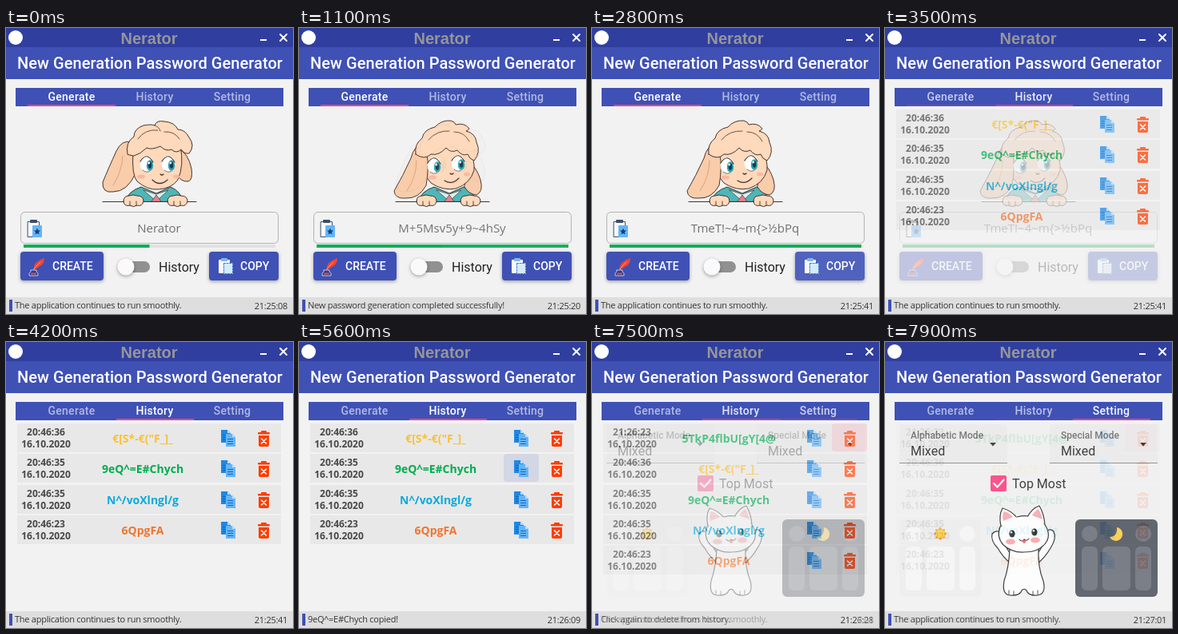
Animation of 359 by 358 pixels, one loop 8000 ms. Source, as an HTML page with a canvas:

```html
<!DOCTYPE html>
<html lang="en">
<head>
<meta charset="utf-8">
<title>Password generator</title>
<style>
html, body { margin: 0; width: 100%; height: 100%; overflow: hidden; background: #f2f2f2; }
canvas { display: block; width: 359px; height: 358px; }
</style>
</head>
<body>
<canvas id="stage" width="359" height="358"></canvas>
<script>
const W = 359, H = 358;
const LOOP = 8000, HOLD = 500, STEP = 100, SLIDE = 1400, FADE = 0.35;
const INDIGO = '#3f51b5', PINK = '#ff4081', GREEN = '#0fad58';
const ROBOTO = 'Roboto, sans-serif', OPEN = '"Open Sans", sans-serif';
let c;

function rect(x, y, w, h, fill, r = 0) {
  c.fillStyle = fill;
  c.beginPath();
  c.roundRect(x, y, w, h, r);
  c.fill();
}

function disc(x, y, r, fill) {
  oval(x, y, r, r, fill);
}

function oval(x, y, rx, ry, fill) {
  c.fillStyle = fill;
  c.beginPath();
  c.ellipse(x, y, rx, ry, 0, 0, Math.PI * 2);
  c.fill();
}

function shape(d, fill, stroke, width = 1) {
  const path = new Path2D(d);
  if (fill) { c.fillStyle = fill; c.fill(path); }
  if (stroke) { c.strokeStyle = stroke; c.lineWidth = width; c.stroke(path); }
}

function text(s, x, y, font, color, align = 'left', spacing = 0) {
  c.font = font;
  c.fillStyle = color;
  c.textAlign = align;
  c.letterSpacing = spacing + 'px';
  c.fillText(s, x, y);
}

function withShadow(draw) {
  c.save();
  c.shadowColor = 'rgba(0,0,0,.35)';
  c.shadowBlur = 4;
  c.shadowOffsetY = 1.5;
  draw();
  c.restore();
}

function at(x, y, draw) {
  c.save();
  c.translate(x, y);
  draw();
  c.restore();
}

// Window frame

function chrome(tab, status, clock) {
  rect(0, 0, W, H, '#f2f2f2');
  rect(0, 0, W, 24, '#303f9f');
  rect(0, 24, W, 40, INDIGO);
  disc(12, 12, 9, '#fff');
  text('Nerator', 179, 20, 'bold 20px "Liberation Sans", Arial, sans-serif', '#969699', 'center');
  rect(318, 14, 8, 2, '#fff');
  shape('M343 8L351 16M351 8L343 16', null, '#fff', 2);
  text('New Generation Password Generator', 14, 51, `500 20px ${ROBOTO}`, '#fff', 'left', .06);

  rect(12, 75, 335, 23, INDIGO);
  ['Generate', 'History', 'Setting'].forEach((name, i) =>
    text(name, [82, 186, 283][i], 91, `500 14px ${ROBOTO}`, i === tab ? '#fff' : '#b2b9e1', 'center', .3));
  const [x, w] = [[27, 110], [138, 97], [235, 97]][tab];
  rect(x, 96, w, 2, PINK);

  rect(0, 337, W, 21, '#dedede');
  rect(4, 340, 4, 15, INDIGO);
  text(status, 11, 351, `11px ${OPEN}`, '#333', 'left', -.25);
  text(clock, 352, 352, `11px ${OPEN}`, '#333', 'right', -.3);
}

// Icons

function clipboard() {
  shape('M27.5 242.5h14v19h-14z', '#f7fbff', '#3d4f66');
  rect(30, 240, 9, 4, '#3d4f66', 1);
  rect(33, 247, 12, 15, '#64b5f6', 1);
  shape('M39 250.5l1.2 2.7 2.8.3-2.1 2 .6 2.8-2.5-1.4-2.5 1.4.6-2.8-2.1-2 2.8-.3z', '#1a3f76');
}

function quill() {
  shape('M34 302Q35 292 48 288Q48 296 41 299Q38 302 34 302Z', '#f4442e');
  shape('M33 305Q37 298 43 293', null, '#ffb59a', .8);
  shape('M31 303h7v2l2 2v3h-11v-3l2-2z', '#2c3f8f', '#c5d3f5', .9);
  rect(31, 306.5, 7, 2, '#f4442e');
}

function copySheets() {
  rect(266, 290, 14, 17, '#f7fbff', 1);
  rect(269, 288, 8, 4, '#7fb6ea', 1);
  rect(272, 294, 12, 14, '#d5eafd');
  c.setLineDash([2, 1.5]);
  shape('M272.5 294.5h11v13h-11z', null, '#3b7fc8');
  c.setLineDash([]);
}

function documents() {
  const sheet = (fill) => {
    shape('M0 0h8l4 4v12h-12z', fill);
    shape('M8 0v4h4z', '#bbdefb');
    for (let i = 0; i < 3; i++) rect(2, 6 + i * 3, 7, 1, '#1565c0');
  };
  at(269, 0, () => sheet('#1e88e5'));
  at(275, 5, () => sheet('#64b5f6'));
}

function trash() {
  rect(315, 2, 15, 2.5, '#ff3d00', 1);
  rect(319, 0, 7, 3, '#ff3d00', 1);
  shape('M316 6h13v12q0 2-2 2h-9q-2 0-2-2z', '#ff3d00');
  shape('M319.5 10l6 6M325.5 10l-6 6', null, '#fff', 1.6);
}

// Mascots

const LINE = '#46332e', SKIN = '#fed9bb', EAR = '#f9ccaa', TEAL = '#4fb6b8';

function eye(x, y) {
  oval(x - 4, y - 2, 8.5, 10.5, '#fff');
  oval(x, y, 4.2, 6.8, '#2ba3b4');
  oval(x, y - .5, 2.2, 4.2, '#123c4a');
  disc(x - 1.2, y - 3, 1.4, '#fff');
  shape(`M${x - 12} ${y - 5}q8-13 16 1`, null, LINE, 1.2);
  shape(`M${x - 9} ${y + 6}q5 4 9 1`, null, LINE, .7);
}

function hoodie() {
  shape('M149 217Q153 204 169 199L188 207L206 199Q218 204 222 217Z', TEAL, LINE);
  shape('M172 203L188 217L203 203L188 208Z', '#d9f0ef', LINE, .7);
  shape('M182 217L188 209L194 217Z', '#e2838c', LINE, .7);
}

function paws() {
  shape('M121 217.5H238', null, LINE, 1.2);
  for (const x of [159, 214]) {
    shape(`M${x - 12} 217q0-7 7-7q5-2 10 0q8 0 8 7q-2 7-8 5q-5 3-9 0q-7 2-8-5z`, SKIN, LINE);
    shape(`M${x - 4} 222v-5M${x + 4} 222v-5`, null, LINE, .9);
  }
}

function dogFacing() {
  hoodie();
  shape('M157 143Q145 139 138 154Q128 176 121 193Q120 207 134 205Q152 205 162 182Z', EAR, LINE);
  shape('M217 152Q228 157 232 176Q234 190 228 192Q218 193 213 182Z', EAR, LINE);
  shape('M159 155Q157 184 164 192Q177 203 190 202Q207 201 215 190Q223 172 218 148Q185 132 159 155Z', SKIN, LINE);
  eye(180, 172);
  eye(207, 172);
  shape('M152 158Q149 143 160 136Q160 126 172 122Q182 120 186 122Q188 115 198 117Q211 118 215 127Q224 127 229 137Q237 147 229 157Q223 158 219 152Q213 158 207 152Q200 155 193 148Q182 153 176 150Q168 158 160 160Z', SKIN, LINE);
  shape('M165 139Q174 126 190 128M186 122Q192 124 193 129M198 130Q211 129 217 139', null, LINE, .8);
  shape('M146 160Q145 180 134 197', null, '#dda27f');
  oval(169, 186, 5, 2.5, '#f9b9a2');
  oval(213, 186, 4, 2.5, '#f9b9a2');
  shape('M193 183q2 2 4 0M183 190Q192 199 202 190', null, LINE, 1.2);
  paws();
}

function dogTilted() {
  hoodie();
  shape('M213 168Q222 174 227 190Q231 205 222 209Q212 208 207 199Z', EAR, LINE);
  shape('M157 156Q154 184 165 194Q180 204 196 201Q214 195 219 178Q221 150 190 144Q168 144 157 156Z', SKIN, LINE);
  shape('M156 145Q144 146 140 163Q130 185 119 204Q120 214 133 213Q150 214 159 197Q163 175 160 158Z', EAR, LINE);
  eye(173, 174);
  eye(203, 171);
  shape('M146 158Q144 145 154 138Q156 127 170 124Q178 115 190 116Q196 118 196 121Q207 118 213 126Q212 128 209 129Q221 132 222 143Q228 156 219 166Q213 164 211 158Q204 161 198 153Q190 157 184 150Q175 160 165 158Q157 166 146 158Z', SKIN, LINE);
  shape('M162 140Q172 128 188 129M194 130Q207 130 213 142', null, LINE, .8);
  shape('M147 166Q147 186 135 204', null, '#dda27f');
  oval(167, 187, 5, 2.5, '#f9b9a2');
  oval(210, 183, 4, 2.5, '#f9b9a2');
  shape('M189 182q2 2 4 0M182 191Q191 197 200 188', null, LINE, 1.2);
  paws();
}

function cat() {
  const ink = '#2b2b2b';
  shape('M156 264Q149 255 148 242Q141 233 134 240Q132 249 141 258Q148 270 157 277Z', '#fff', ink, 1.2);
  shape('M191 264Q199 255 200 242Q204 231 211 237Q215 246 207 258Q200 270 191 277Z', '#fff', ink, 1.2);
  shape('M156 259Q155 282 149 299Q146 316 156 317Q169 318 171 311Q174 308 177 311Q179 318 191 317Q202 315 198 299Q191 282 192 258Z', '#fff', ink, 1.2);
  shape('M145 231Q142 217 147 208Q158 211 165 220ZM178 219Q184 208 193 205Q199 215 200 229Z', '#fff', ink, 1.2);
  shape('M148 224Q146 217 149 212Q156 214 160 219ZM184 217Q188 211 192 209Q196 216 197 222Z', '#f8a9b0');
  shape('M143 238Q147 222 165 219Q186 215 199 226Q208 239 202 250Q191 264 171 263Q143 262 143 238Z', '#fff');
  shape('M144 231Q139 244 148 254Q159 264 174 263Q194 263 202 250Q208 240 199 227M165 219Q173 217 179 218', null, ink, 1.2);
  for (const [x, y] of [[159, 240], [187, 238]]) {
    oval(x, y, 3.6, 4.6, ink);
    disc(x - 1, y - 1.8, 1.3, '#fff');
  }
  oval(157, 250, 6, 3.5, '#f9a7a9');
  oval(188, 248, 6, 3.5, '#f9a7a9');
  shape('M168 247Q171 251 174 247Q177 250 180 246', null, ink, 1.1);
  shape('M171 248Q174 256 177 248Z', '#e8606a');
  shape('M155 311v5M161 312v5M185 312v5M191 311v5', null, ink, .9);
}

// Pages

function button(x, w, label, labelX, fill = INDIGO) {
  withShadow(() => rect(x, 280, w, 36, fill, 4));
  text(label, labelX, 303, `500 14px ${ROBOTO}`, '#fff');
}

function generatePage({ dog, password, progress, status, clock, hover }) {
  chrome(0, status, clock);
  dog();
  c.strokeStyle = '#b4b4b4';
  c.lineWidth = 1;
  c.beginPath();
  c.roundRect(18.5, 230.5, 322, 39, 5);
  c.stroke();
  clipboard();
  text(password, 191.5, 256, `15px ${OPEN}`, '#707070', 'center');
  rect(22, 271, 315, 4, '#e2e2e2');
  rect(22, 271, 315 * progress, 4, GREEN);
  button(18, 104, 'CREATE', 58);
  quill();
  button(254, 87, 'COPY', 293, hover ? '#5062bd' : INDIGO);
  copySheets();
  rect(146, 292, 34, 14, '#919191', 7);
  withShadow(() => disc(150, 299, 10.5, '#fafafa'));
  text('History', 191, 305, `16px ${ROBOTO}`, '#222');
}

const DATE = '16.10.2020';
const SAVED = [
  ['20:46:36', '€[S*-€("F_]_', '#fbc02d'],
  ['20:46:35', '9eQ^=E#Chych', '#00ad50'],
  ['20:46:35', 'N^/voXlngl/g', '#08abdd'],
  ['20:46:23', '6QpgFA', '#f0752f'],
];

function historyPage({ rows, status, clock, hover }) {
  chrome(1, status, clock);
  rows.forEach(([time, password, color], i) => at(0, 102 + Math.round(i * 38.3), () => {
    rect(14, 0, 330, 36, '#e8e8e8');
    if (hover && hover.row === i) rect(hover.x, 0, 44, 35, hover.fill, 4);
    text(time, 50, 15, `bold 12px ${OPEN}`, '#484848', 'center');
    text(DATE, 50, 30, `bold 12px ${OPEN}`, '#484848', 'center');
    text(password, 171, 24, `bold 14px ${OPEN}`, color, 'center');
    at(0, 8, documents);
    at(0, 9, trash);
  }));
}

function select(x, label) {
  rect(x, 103, 135, 48, '#ececec', [4, 4, 0, 0]);
  rect(x, 151, 135, 1, '#8a8a8a');
  text(label, x + 14, 121, `500 12px ${ROBOTO}`, '#6c6c6c');
  text('Mixed', x + 14, 142, `16px ${ROBOTO}`, '#2a2a2a');
  shape(`M${x + 113} 126h8l-4 4.5z`, '#333');
}

function themeCard(x, back, front) {
  rect(x, 222, 103, 97, back, 6);
  disc(x + 18, 240, 10, front);
  disc(x + 85, 240, 10, front);
  rect(x + 8, 256, 20, 55, front, 6);
  rect(x + 34, 256, 35, 55, front, 6);
  rect(x + 75, 256, 20, 55, front, 6);
}

function settingPage() {
  chrome(2, SMOOTH, '21:27:01');
  select(18, 'Alphabetic Mode');
  select(206, 'Special Mode');
  rect(132, 167, 20, 20, PINK, 2);
  shape('M136 177l4.5 4.5 8-9', null, '#fff', 2.2);
  text('Top Most', 159, 183, `16px ${ROBOTO}`, '#2a2a2a');
  themeCard(18, '#eeeeee', '#f7f7f7');
  themeCard(238, '#50555f', '#6c717b');
  at(69, 240, () => {
    for (let i = 0; i < 8; i++) {
      c.rotate(Math.PI / 4);
      shape('M-2.5 -5L0 -8.5L2.5 -5Z', '#f7a928');
    }
    disc(0, 0, 5, '#ffd045');
  });
  shape('M290 232A8.5 8.5 0 1 1 281 244Q291 244 290 232Z', '#ffcc45');
  cat();
}

const SMOOTH = 'The application continues to run smoothly.';
const slides = [
  () => generatePage({ dog: dogFacing, password: 'Nerator', progress: .5, status: SMOOTH, clock: '21:25:08' }),
  () => generatePage({ dog: dogTilted, password: 'M+5Msv5y+9~4hSy', progress: 1,
    status: 'New password generation completed successfully!', clock: '21:25:20' }),
  () => generatePage({ dog: dogTilted, password: 'TmeT!~4~m{>½bPq', progress: 1, status: SMOOTH,
    clock: '21:25:41', hover: true }),
  () => historyPage({ rows: SAVED, status: SMOOTH, clock: '21:25:41' }),
  () => historyPage({ rows: SAVED, status: '9eQ^=E#Chych copied!', clock: '21:26:09',
    hover: { row: 1, x: 256, fill: '#d3d6e3' } }),
  () => historyPage({ rows: [['21:26:23', '5TkP4flbU[gY[4@', '#00ad50'], ...SAVED],
    status: 'Click again to delete from history.', clock: '21:26:28',
    hover: { row: 0, x: 300, fill: '#efcdd3' } }),
  settingPage,
].map(draw => {
  const layer = document.createElement('canvas');
  layer.width = W;
  layer.height = H;
  c = layer.getContext('2d');
  c.lineJoin = c.lineCap = 'round';
  draw();
  return layer;
});

const stage = document.getElementById('stage').getContext('2d');

// Each step blends the next slide over what is already showing.
function frame() {
  const t = performance.now() % LOOP;
  const index = Math.floor(t / SLIDE);
  const step = Math.max(0, Math.floor((t % SLIDE - HOLD) / STEP) + 1);
  stage.globalAlpha = 1;
  stage.drawImage(slides[index], 0, 0);
  stage.globalAlpha = 1 - (1 - FADE) ** step;
  stage.drawImage(slides[index + 1], 0, 0);
  requestAnimationFrame(frame);
}
frame();
</script>
</body>
</html>
```
